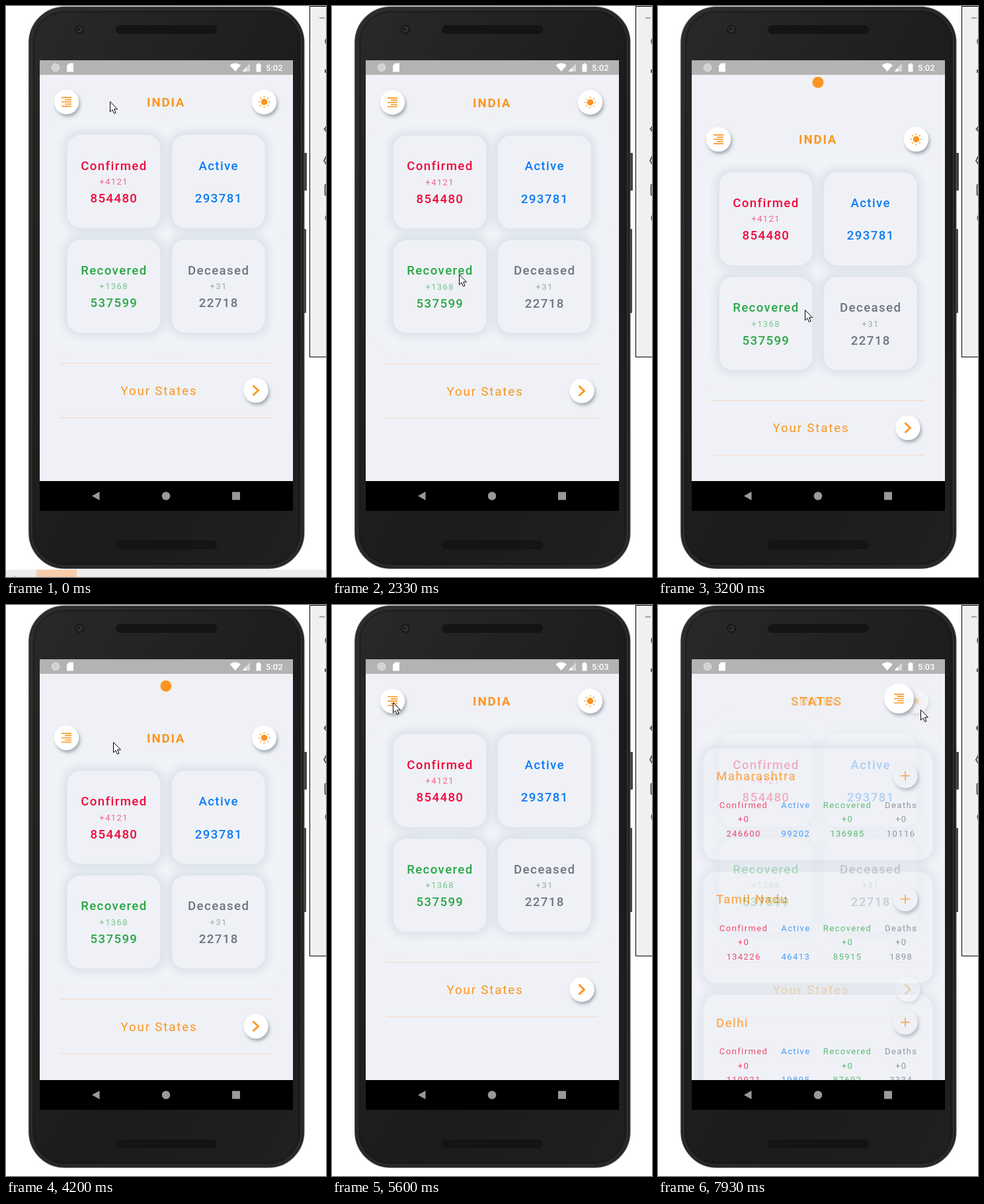
Recreate the animation shown at these times as an HTML page. Size 484 by 863 pixels, loop 8 s.

```html
<!DOCTYPE html>
<html lang="en">
<head>
<meta charset="utf-8">
<style>
  html, body { margin: 0; width: 100%; height: 100%; overflow: hidden; background: #fff; }
  svg { display: block; width: 484px; height: 863px; font-family: Roboto, sans-serif; }
  .head { font-size: 18.64px; letter-spacing: 1.4px; font-weight: 500; }
  .title { font-size: 18.64px; letter-spacing: 1.87px; font-weight: 700; }
  .thin { font-size: 18.64px; letter-spacing: 1.87px; }
  .small { font-size: 13.05px; letter-spacing: 1.4px; }
</style>
</head>
<body>
<svg id="stage" viewBox="0 0 484 863" xmlns="http://www.w3.org/2000/svg"></svg>
<script>
const ORANGE = '#fb951f', PAPER = '#eff1f6';
const RED = '#f0093c', BLUE = '#0d7bf2', GREEN = '#28a745', GREY = '#6c757d';
const MENU_AT = [91.5, 145], BACK_AT = [398, 141];

// ---------- markup helpers ----------
const text = (x, y, label, cls, color, extra = 'text-anchor="middle"') =>
  `<text x="${x}" y="${y}" class="${cls}" fill="${color}" ${extra}>${label}</text>`;
const rect = (x, y, w, h, fill, r = 0, extra = '') =>
  `<rect x="${x}" y="${y}" width="${w}" height="${h}" rx="${r}" fill="${fill}" ${extra}/>`;
const circle = (x, y, r, fill, extra = '') =>
  `<circle cx="${x}" cy="${y}" r="${r}" fill="${fill}" ${extra}/>`;
const strokes = (d, width) =>
  `<path d="${d}" fill="none" stroke="${ORANGE}" stroke-width="${width}"/>`;

const icons = {
  menu: strokes('M-7.5-6.6H7.5M-2.5-3.3H7.5M-7.5 0H7.5M-2.5 3.3H7.5M-7.5 6.6H7.5', 1.6),
  next: strokes('M-4.5-7.5L3.5 0L-4.5 7.5', 2.8),
  back: strokes('M3.5-6L-2.8 0L3.5 6', 2.3),
  plus: strokes('M-7 0H7M0-7V7', 1.8),
  sun: circle(0, 0, 4.8, ORANGE) + [...Array(8)].map((_, i) =>
    `<path d="M0-6.8V-8.6" stroke="${ORANGE}" stroke-width="1.7" transform="rotate(${i * 45})"/>`).join('')
};
const button = (x, y, icon, fill = '#fff', id = '') =>
  `<g ${id} transform="translate(${x} ${y})">${circle(0, 0, 18.6, fill, 'filter="url(#lift)"')}${icons[icon]}</g>`;

function cards(boxes, r) {
  const layer = (grow, fill, extra) => boxes.map(([x, y, w, h]) =>
    rect(x - grow, y - grow, w + 2 * grow, h + 2 * grow, fill, r + grow, extra)).join('');
  return layer(20, '#f4f6f9', 'filter="url(#glow)"') +
    layer(8, '#d5dde6', 'filter="url(#shade)" opacity=".85"') +
    layer(0, PAPER, 'stroke="#f1f3f7"');
}

// ---------- home page ----------
const totals = [
  [163, 195, 'Confirmed', '+4121', '854480', RED],
  [321.3, 195, 'Active', '', '293781', BLUE],
  [163, 353.2, 'Recovered', '+1368', '537599', GREEN],
  [321.3, 353.2, 'Deceased', '+31', '22718', GREY]
];
const home = `<g id="home">
  ${cards(totals.map(([x, y]) => [x - 69.7, y + .5, 139.4, 139.4]), 19)}
  ${totals.map(([x, y, name, plus, sum, color]) =>
    text(x + .4, y + 52.5, name, 'head', color) +
    text(x + .2, y + 75, plus, 'small', color, 'text-anchor="middle" opacity=".6"') +
    text(x + .4, y + 102, sum, 'head', color)).join('')}
  ${button(...MENU_AT, 'menu', '#fff', 'id="menu"')}
  ${text(242.2, 152, 'INDIA', 'title', ORANGE)}
  ${button(390.5, 145, 'sun')}
  <path d="M82 540H402M82 622.5H402" stroke="#f6d6c0"/>
  ${text(231.5, 588, 'Your States', 'thin', ORANGE)}
  ${button(378, 581, 'next')}
</g>`;

// ---------- states page ----------
const states = [
  ['Maharashtra', 246600, 99202, 136985, 10116],
  ['Tamil Nadu', 134226, 46413, 85915, 1898],
  ['Delhi', 110921, 19895, 87692, 3334]
];
const columns = [['Confirmed', 129.6, RED], ['Active', 208.4, BLUE], ['Recovered', 286.6, GREEN], ['Deaths', 367.7, GREY]];
const cardTop = i => 214 + i * 186.3;
const statePage = `<g id="states">
  ${rect(51, 104, 383, 614, PAPER, 0, 'id="paper"')}
  <g id="sheet">
    ${cards(states.map((_, i) => [69, cardTop(i), 346, 167.5]), 20)}
    ${text(240, 148.6, 'STATES', 'title', ORANGE)}
    ${states.map(([name, ...counts], i) => {
      const y = cardTop(i);
      return text(88, y + 48, name, 'head', ORANGE, '') + button(374, y + 41, 'plus', PAPER) +
        columns.map(([label, x, color], c) =>
          text(x, y + 89.5, label, 'small', color) +
          (c === 1 ? '' : text(x, y + 111, '+0', 'small', color)) +
          text(x, y + 132.5, counts[c], 'small', color)).join('');
    }).join('')}
  </g>
</g>`;

// ---------- phone and surroundings ----------
const speaker = y => rect(166, y, 153, 13, '#111', 6.5) + rect(167, y + 1, 151, 11, 'url(#mesh)', 5.5);
const phone = `
  ${rect(448, 222, 7, 57, '#444', 1)}${rect(448, 337, 6, 127, '#444', 1)}
  ${rect(34.8, 1.5, 416, 848.5, 'url(#body)', 54, 'stroke="#444" stroke-width="1.4"')}
  ${rect(38.5, 5, 408.5, 841.5, 'none', 50, 'stroke="#303030" stroke-width="2"')}
  ${rect(42.5, 9, 400.5, 833.5, 'none', 46, 'stroke="#171717" stroke-width="1"')}
  ${circle(111, 35.5, 7, '#191919')}${circle(111, 35.5, 4.5, '#303236')}${circle(110, 35, 2, '#15171b')}
  ${speaker(29)}${speaker(808)}
  ${rect(51, 82, 383, 681, PAPER)}`;

const statusBar = `
  ${rect(51, 82, 383, 22, '#b3b3b3')}
  ${circle(75, 93, 5.8, '#d2d2d2', 'stroke="#e4e4e4"')}
  <path d="M95.5 86.5H102V99.5H92V90ZM338.5 89.5Q346.8 83 355 89.5L346.8 99Z" fill="#fff"/>
  <path d="M369 87V99H357.5Z" fill="#d9d9d9"/><path d="M363 93V99H357.5Z" fill="#fff"/>
  <path d="M378.5 88H380.5V86.5H383.5V88H385.5V99.5H378.5Z" fill="#fff"/>
  <text id="clock" x="393" y="98" fill="#fff" font-size="13" font-weight="500"></text>`;

const navBar = `${rect(51, 718, 383, 45, '#000')}
  <path d="M141.5 734V747L130 740.5Z" fill="#999"/>${circle(242, 740.5, 6.3, '#999')}${rect(342, 734.5, 12, 12, '#999')}`;

const sidePanel = `${rect(459.5, .5, 40, 530, '#f0f0f0', 0, 'stroke="#000"')}
  <path d="M474 18H482" stroke="#888" stroke-width="1.5"/>
  <g fill="none" stroke="#4a5a62" stroke-width="2"><path d="M485 49Q481.5 53 485 58M483 96V101M485 182L481.5 186L485 190M485 226L481 234L485 240M484 270Q482.5 270 482.5 272V283Q482.5 286 484 286M485 316Q482 320 485 325"/></g>`;

const strip = `<g id="strip">${rect(0, 852, 484, 11, '#ededed')}${rect(46, 852, 61, 11, '#f9cdab', 0, 'id="highlight"')}
  <path d="M10 863Q13 859 17 863Z" fill="#ccc"/></g>`;

const stage = document.getElementById('stage');
stage.innerHTML = `<defs>
  <linearGradient id="body" x1="0" y1="0" x2="1" y2="1">
    <stop offset="0" stop-color="#292929"/><stop offset=".3" stop-color="#222"/>
    <stop offset=".6" stop-color="#1b1b1b"/><stop offset="1" stop-color="#202020"/></linearGradient>
  <pattern id="mesh" width="4" height="4" patternUnits="userSpaceOnUse">
    <rect width="4" height="4" fill="#0c0c0c"/><circle cx="1" cy="1" r=".8" fill="#303030"/><circle cx="3" cy="3" r=".8" fill="#303030"/></pattern>
  <filter id="lift" x="-50%" y="-50%" width="200%" height="200%">
    <feDropShadow dx="2" dy="3.5" stdDeviation="2.6" flood-color="#6d7682" flood-opacity=".6"/></filter>
  <filter id="shade" x="-30%" y="-30%" width="160%" height="160%"><feGaussianBlur stdDeviation="8"/></filter>
  <filter id="glow" x="-30%" y="-30%" width="160%" height="160%"><feGaussianBlur stdDeviation="7"/></filter>
  <clipPath id="screen"><rect x="51" y="104" width="383" height="614"/></clipPath>
</defs>
${rect(0, 0, 484, 863, '#fff')}${strip}${sidePanel}${phone}
<g clip-path="url(#screen)">${home}${statePage}
  <g id="hero">${circle(0, 0, 18.6, '#fff', 'id="heroDisc" filter="url(#lift)"')}
    <g id="heroMenu">${icons.menu}</g><g id="heroBack">${icons.back}</g></g>
</g>
${statusBar}${navBar}${circle(242, 0, 8.5, ORANGE, 'id="dot"')}
<path id="cursor" d="M.5.5V16L4 12.7L6.5 18.5L9 17.4L6.6 11.8H11.5Z" fill="#fff" stroke="#000"/>`;

// ---------- motion ----------
const el = id => document.getElementById(id);
const set = (id, name, value) => el(id).setAttribute(name, value);
const show = (id, on) => set(id, 'visibility', on ? 'visible' : 'hidden');
const move = (id, x, y) => set(id, 'transform', `translate(${x} ${y})`);
const clamp = v => Math.min(1, Math.max(0, v));
const mix = (a, b, k) => a + (b - a) * k;

function bezier(x1, y1, x2, y2) {
  const at = (s, a, b) => 3 * (1 - s) ** 2 * s * a + 3 * (1 - s) * s * s * b + s ** 3;
  return x => {
    let lo = 0, hi = 1;
    for (let i = 0; i < 24; i++) {
      const mid = (lo + hi) / 2;
      if (at(mid, x1, x2) < x) lo = mid; else hi = mid;
    }
    return at(lo, y1, y2);
  };
}
const fastOutSlowIn = bezier(.4, 0, .2, 1), easeIn = bezier(.42, 0, 1, 1);
const settle = ms => { const k = Math.max(0, ms) * .014; return (1 + k) * Math.exp(-k); };

// time, x, y
const pointer = [
  [0, 157, 144], [600, 186, 330], [800, 186, 330], [1400, 130, 260], [1667, 115, 212], [1733, 112, 188],
  [2330, 192, 404], [2733, 192, 564], [2830, 192, 576], [3000, 192, 576], [3400, 252, 342], [4200, 162, 207],
  [4700, 130, 200], [5133, 98, 183], [5400, 92, 147], [6070, 92, 147], [6300, 220, 195], [6533, 380, 159],
  [6670, 400, 150], [6933, 390, 258], [7200, 388, 255], [7500, 394, 134], [7800, 397, 150], [7933, 397, 158], [8000, 397, 158]
];
function pointerAt(t) {
  const i = pointer.findIndex(p => p[0] > t), a = pointer[i - 1], b = pointer[i];
  const k = (t - a[0]) / (b[0] - a[0]);
  return [mix(a[1], b[1], k), mix(a[2], b[2], k)];
}

const GRAB = 2330, RELEASE = 2830, REFRESHED = 5008, PUSH = 5600, POP = 7878, HELD = 55.7;
function pullAt(t) {
  if (t < GRAB) return 0;
  const drag = pointerAt(Math.min(t, RELEASE))[1] - 404;
  const pulled = 614 * (1 - 1 / (1 + .52 * drag / 614));
  if (t < RELEASE) return pulled;
  return t < REFRESHED ? mix(HELD, pulled, settle(t - RELEASE)) : HELD * settle(t - REFRESHED);
}

function draw(t) {
  move('cursor', ...pointerAt(t));
  move('home', 0, pullAt(t));
  el('clock').textContent = t < 4600 ? '5:02' : '5:03';
  show('strip', t < 2100);
  set('highlight', 'opacity', mix(1, .5, clamp(t / 1733)));

  show('dot', t > 2500 && t < REFRESHED);
  set('dot', 'cy', 122.5 - 19 * Math.sin(Math.PI * Math.max(0, t - 2540) / 835) ** 2);

  const popping = t > POP;
  const page = popping ? 1 - clamp((t - POP) / 300) : clamp((t - PUSH) / 300);
  set('states', 'opacity', easeIn(page));
  show('states', page > 0);
  const slide = 153 * (1 - fastOutSlowIn(page));
  move('sheet', 0, slide);
  move('paper', 0, slide);

  const flight = popping ? 1 - fastOutSlowIn(1 - page) : fastOutSlowIn(page);
  const flying = page > 0 && page < 1;
  show('menu', page === 0);
  show('hero', page > 0);
  show('heroMenu', page > 0 && popping);
  show('heroBack', page > 0 && !popping);
  set('heroDisc', 'r', flying ? 22.4 : 18.6);
  move('hero', mix(MENU_AT[0], BACK_AT[0], flight), mix(MENU_AT[1], BACK_AT[1], flight));
}

const STEP = 1000 / 15, start = performance.now();
function tick() {
  const t = (performance.now() - start) % 8000;
  draw(Math.min(119, Math.floor((t + 5) / STEP)) * STEP);
  requestAnimationFrame(tick);
}
tick();
</script>
</body>
</html>
```
